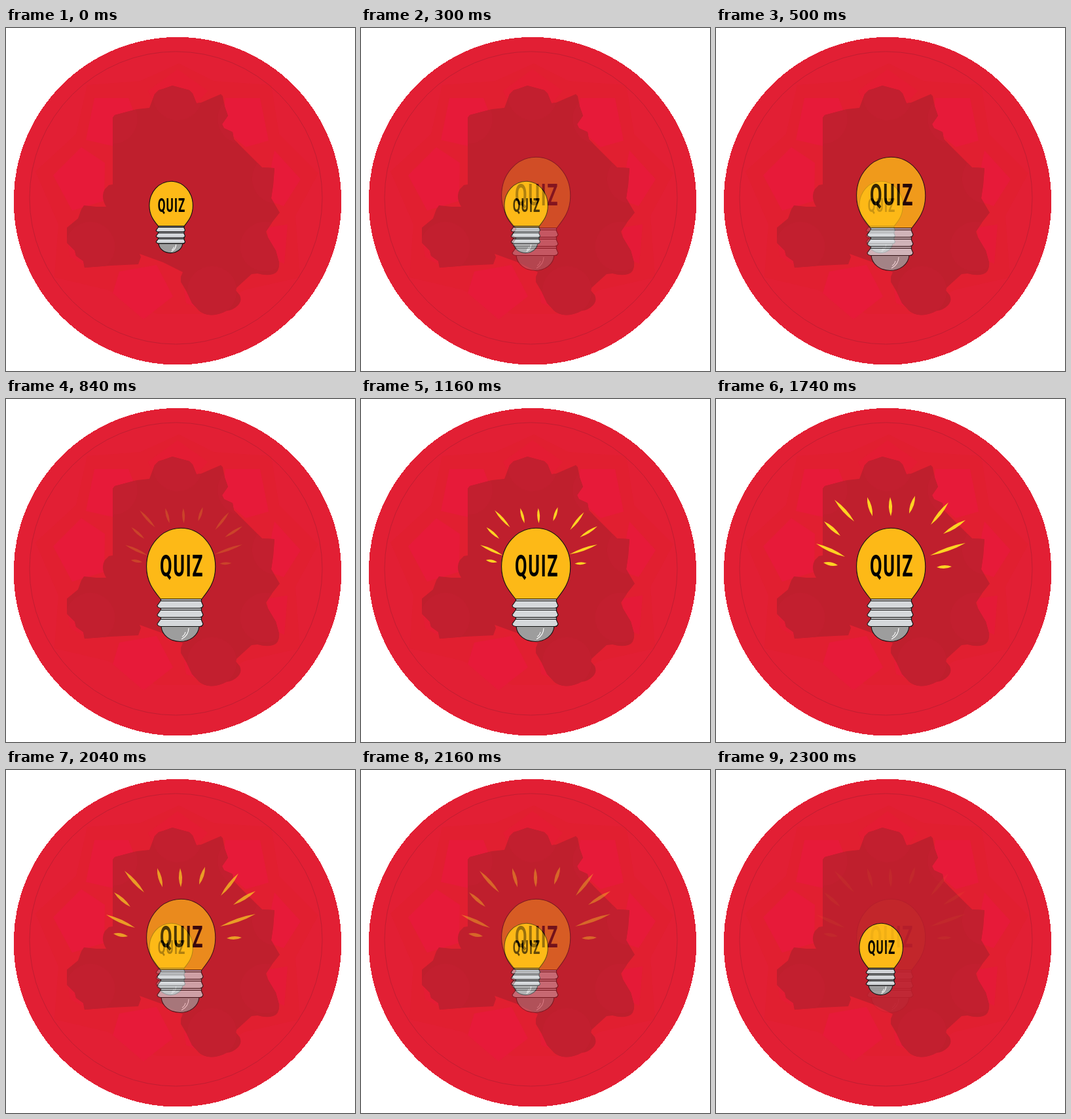
Animation, 533 px wide and 524 px high, one loop 2320 ms. Source, as an HTML page:

```html
<!DOCTYPE html>
<html lang="en">
<head>
<meta charset="utf-8">
<title>Quiz bulb</title>
<style>
  html, body { margin: 0; width: 100%; height: 100%; overflow: hidden; background: #fff; }
  svg { display: block; width: 533px; height: 524px; }
  .bulb path { stroke: #111; stroke-width: 1.1; stroke-linejoin: round; vector-effect: non-scaling-stroke; }
  .bulb .shine { fill: none; stroke: #fff; }
  .bulb text { font: 700 46.4px Roboto, "Liberation Sans", sans-serif; letter-spacing: 3px; text-anchor: middle; }
</style>
</head>
<body>
<svg viewBox="0 0 533 524">
  <defs>
    <path id="map" d="M163 137L166 133 200 124 219 122 227 101 233 95 240 93 254 88 280 95 285 100 291 115 298 114 328 101 331 104 334 120 339 134 330 147 333 153 346 159 348 170 391 213 410 214 408 240 405 260 418 282 407 296 397 311 400 320 412 340 417 358Q418 373 408 376T384 375L375 376 352 397 351 401 357 408Q361 417 354 424T337 432C322 440 306 441 295 432L284 420 276 403 267 388V380L270 373 240 358 204 345 206 350 202 361 160 363 120 366 118 356 107 348 105 340 93 328V305L110 291 115 277 119 271 138 273 153 273Q144 258 151 246L157 240 163 239Z"/>
    <clipPath id="inMap"><use href="#map"/></clipPath>
    <g id="backdrop">
      <circle cx="262" cy="264.2" r="250.3" fill="#e21f34" shape-rendering="crispEdges"/>
      <path fill="#e11f30" d="M264 54L317 81 405 87 417 162 477 222 442 287 449 381 365 400 299 437H230L155 400 74 381 80 300 45 219 107 162 124 87 205 81Z"/>
      <g fill="#e71a39">
        <path d="M135 107H187L204 150 166 181 122 171Z"/>
        <path d="M115 182L151 206 150 264 101 279 72 225Z"/>
        <path d="M173 372L230 362 255 410 210 445 163 405Z"/>
        <path d="M262 63L308 96 291 116H227L217 96Z" opacity=".45"/>
        <path d="M335 107H388L401 172 366 182 328 150Z"/>
        <path d="M410 187L450 231 424 272 395 262Z"/>
        <path d="M398 305L430 300 425 360 405 352Z" opacity=".8"/>
        <path d="M93 318L122 330 120 362 98 350Z" opacity=".5"/>
        <path d="M272 398L290 426 275 420Z" opacity=".7"/>
      </g>
      <use href="#map" fill="#bf1f2d"/>
      <g id="spots" fill="#c21f2f" clip-path="url(#inMap)"></g>
      <circle cx="259.5" cy="259.5" r="223.5" fill="none" stroke="#b71f31" stroke-width=".8"/>
    </g>
    <g id="bulb" class="bulb">
      <path fill="#9d9d9d" d="M237 347C238 362 252 370.5 266 370.5S294 362 295 347Z"/>
      <path class="shine" d="M279 350Q279 361 268 367M274 356Q273 361 269 363"/>
      <path fill="#c0c2c5" d="M236.5 305.5H298.5V347.5H236.5Z"/>
      <g id="ribs" fill="#d5d8db"></g>
      <path fill="#fdb917" d="M236 305.5C226 293 214.6 280 214.6 256C214.6 223 238 197.3 267.2 197.3S319.8 223 319.8 256C319.8 280 309 293 299 305.5Z"/>
      <text transform="translate(268.6 271) scale(.58 1)">QUIZ</text>
    </g>
    <g id="rays" fill="#fdd323"></g>
  </defs>
  <g id="under"></g>
  <g id="over"></g>
</svg>
<script>
const byId = id => document.getElementById(id);

// Nine faint discs set evenly on a ring.
byId('spots').innerHTML = Array.from({ length: 9 }, (_, i) => {
  const angle = (i * 40 - 90) * Math.PI / 180;
  return `<circle cx="${262 + 154 * Math.cos(angle)}" cy="${257 + 154 * Math.sin(angle)}" r="38"/>`;
}).join('');

const rib = y => `<path d="M236 ${y}H298L301 ${y + 7}Q300 ${y + 11} 296 ${y + 11}H236Q231 ${y + 10} 231 ${y + 7}Z"/>`;
byId('ribs').innerHTML = [308.5, 322.5, 336.5].map(rib).join('');

// Outer and inner end of each ray.
const rays = [
  [164, 250, 186, 254], [153, 221, 197, 241], [165, 187, 190, 209], [181, 154, 211, 187],
  [231, 150, 239, 179], [266, 150, 267, 179], [304, 148, 295, 175], [355, 158, 328, 192],
  [381, 185, 347, 206], [381, 220, 327, 239], [360, 256, 337, 257]
];
function lens([x1, y1, x2, y2], bulge = 5.2) {
  const length = Math.hypot(x2 - x1, y2 - y1);
  const mx = (x1 + x2) / 2, my = (y1 + y2) / 2;
  const nx = -(y2 - y1) / length * bulge, ny = (x2 - x1) / length * bulge;
  return `<path d="M${x1} ${y1}Q${mx + nx} ${my + ny} ${x2} ${y2}Q${mx - nx} ${my - ny} ${x1} ${y1}Z"/>`;
}
byId('rays').innerHTML = rays.map(r => lens(r)).join('');

const use = (id, transform = '') => `<use href="#${id}" transform="${transform}"/>`;
const scenes = [
  use('bulb', 'translate(83.3 109.5) scale(.632)'),
  use('bulb'),
  use('bulb') + use('rays', 'translate(62.2 47.8) scale(.784 .793)'),
  use('bulb') + use('rays')
].map(content => use('backdrop') + content);

const HOLD = 200, STEP = 20, STEPS = 20;
const SCENE = HOLD + STEP * (STEPS - 1);
const LOOP = SCENE * scenes.length;
const under = byId('under'), over = byId('over');
let shown = -1;

function draw(time) {
  const t = time % LOOP;
  const index = Math.floor(t / SCENE);
  const local = t - index * SCENE;
  if (index !== shown) {
    under.innerHTML = scenes[index];
    over.innerHTML = scenes[(index + 1) % scenes.length];
    shown = index;
  }
  const mix = local < HOLD ? 0 : (Math.floor((local - HOLD) / STEP) + 1) / STEPS;
  over.setAttribute('opacity', mix);
}

const start = performance.now();
function tick() {
  draw(performance.now() - start);
  requestAnimationFrame(tick);
}
tick();
</script>
</body>
</html>
```
